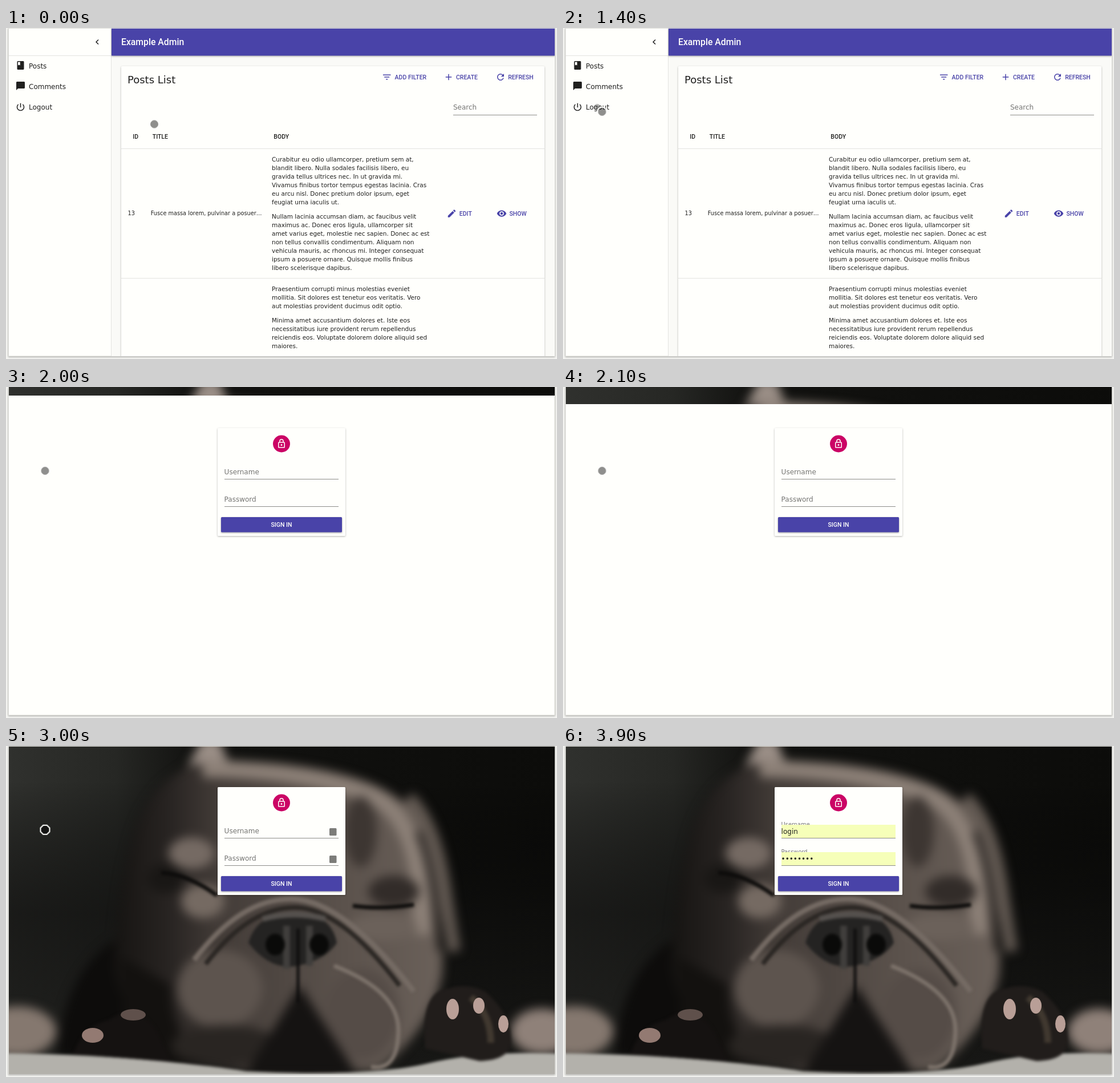
An HTML page that plays this animation: 966 px wide and 580 px high, repeating every 4000 ms.

```html
<!DOCTYPE html>
<html lang="en">
<head>
<meta charset="utf-8">
<title>Admin sign out</title>
<style>
  html, body { margin: 0; width: 100%; height: 100%; overflow: hidden; background: #f4f4f1; }
  svg { display: block; }
  text { font: 12px "DejaVu Sans", sans-serif; fill: #20201f; white-space: pre; }
  .body { font-size: 10.5px; }
  .cell { font-size: 9.75px; }
  .heading { font-size: 18px; }
  .caps { font: 500 10.5px Roboto, sans-serif; }
  .bar { font: 500 15.75px Roboto, sans-serif; }
  .hint { fill: #757573; }
  .small { font-size: 9.84px; }
  .dark { fill: #20201f; }
  .accent { fill: #4943a8; }
  .light { fill: #fffffc; }
  .paper { fill: #fffffc; filter: drop-shadow(0 1px 1.5px rgba(0,0,0,.3)); }
  .raised { filter: drop-shadow(0 1.5px 1.5px rgba(0,0,0,.35)); }
  .rule { stroke: #e3e3e0; }
  .field { stroke: #8d8d8a; }
</style>
</head>
<body>
<svg id="stage" width="966" height="580" viewBox="0 0 966 580">
  <defs>
    <clipPath id="window"><rect x="5" y="1" width="957" height="574"/></clipPath>
    <clipPath id="loaded"><rect id="loadedBox" x="5" y="1" width="957" height="574"/></clipPath>
    <linearGradient id="wall">
      <stop offset="0" stop-color="#30312e"/><stop offset=".2" stop-color="#262724"/>
      <stop offset=".34" stop-color="#121210"/><stop offset="1" stop-color="#0c0c0a"/>
    </linearGradient>
    <linearGradient id="shade" x2="0" y2="1">
      <stop offset="0" stop-color="#000" stop-opacity="0"/><stop offset=".45" stop-color="#0e0e0d" stop-opacity=".65"/>
      <stop offset="1" stop-color="#1c1c1a" stop-opacity=".7"/>
    </linearGradient>
    <linearGradient id="fur">
      <stop offset="0" stop-color="#161412"/><stop offset=".17" stop-color="#282422"/>
      <stop offset=".32" stop-color="#433c38"/><stop offset=".7" stop-color="#5b524c"/>
      <stop offset="1" stop-color="#6b615a"/>
    </linearGradient>
    <filter id="soft" x="-30%" y="-30%" width="160%" height="160%" color-interpolation-filters="sRGB"><feGaussianBlur stdDeviation="9"/></filter>
    <filter id="crisp" x="-30%" y="-30%" width="160%" height="160%" color-interpolation-filters="sRGB"><feGaussianBlur stdDeviation="2.5"/></filter>
  </defs>

  <rect width="966" height="580" fill="#f4f4f1"/>
  <rect class="raised" x="4.5" y=".5" width="957.5" height="574.5" fill="#fffffc" stroke="#deded9"/>

  <g id="list" clip-path="url(#window)">
    <rect x="185" y="1" width="777" height="574" fill="#fafaf7"/>
    <path class="rule" d="M184.5 1V575M5 48.5H184" fill="none"/>
    <rect class="accent raised" x="185" y="1" width="777" height="47.5"/>
    <rect class="paper" x="202" y="67" width="742" height="540" rx="1.5"/>
    <path class="rule" d="M202 211.5H944M202 438.5H944"/>
    <path class="field" d="M784 152.5H931"/>
    <circle id="press" cx="60" cy="139" r="6" fill="#b7b7b5"/>
  </g>

  <g id="photo" clip-path="url(#loaded)">
    <rect width="966" height="580" fill="url(#wall)"/>
    <rect y="60" width="966" height="520" fill="url(#shade)"/>
    <g filter="url(#soft)">
      <ellipse cx="20" cy="500" rx="68" ry="44" fill="#85786f"/>
      <ellipse cx="940" cy="500" rx="55" ry="40" fill="#8f8179"/>
      <path d="M90 545Q100 400 190 340L300 560Z" fill="#0d0c0b"/>
      <path d="M318 36L344 -12H374L392 35Z" fill="#9a8e86"/>
      <path d="M330 32Q250 65 222 160T190 390Q210 500 300 555L440 570L650 570Q745 500 765 400Q770 250 740 150Q700 70 560 42Q440 20 330 32Z" fill="url(#fur)"/>
      <path d="M345 40Q520 40 640 85Q735 130 728 330" fill="none" stroke="#8c8077" stroke-width="30"/>
      <path d="M705 90Q750 130 768 240Q778 310 786 360" fill="none" stroke="#625952" stroke-width="22"/>
      <path d="M722 150Q752 220 762 360" fill="none" stroke="#1d1a18" stroke-width="10"/>
      <ellipse cx="622" cy="150" rx="28" ry="62" fill="#3d3632"/>
      <ellipse cx="325" cy="188" rx="40" ry="28" fill="#756a63"/>
      <ellipse cx="280" cy="232" rx="32" ry="26" fill="#191715"/>
      <ellipse cx="345" cy="272" rx="38" ry="30" fill="#756a62"/>
      <ellipse cx="680" cy="255" rx="45" ry="28" fill="#322c29"/>
      <ellipse cx="660" cy="318" rx="62" ry="24" fill="#6b615a"/>
      <path d="M200 370Q260 400 290 420Q285 500 350 560L210 565Z" fill="#13110f"/>
      <ellipse cx="375" cy="425" rx="75" ry="68" fill="#5d544e"/>
      <ellipse cx="385" cy="525" rx="95" ry="36" fill="#292522"/>
      <ellipse cx="625" cy="470" rx="65" ry="80" fill="#554c47"/>
      <path d="M515 420L615 575H420Z" fill="#151312"/>
    </g>
    <g filter="url(#crisp)">
      <path d="M330 375Q410 268 500 268T715 430" fill="none" stroke="#756b64" stroke-width="9"/>
      <path d="M350 382Q425 284 505 283T690 420" fill="none" stroke="#2a2623" stroke-width="8"/>
      <path d="M272 222Q320 225 370 262M608 280Q655 287 715 278" fill="none" stroke="#0d0c0b" stroke-width="7"/>
      <path d="M575 385Q690 430 688 500T640 562" fill="none" stroke="#7d736b" stroke-width="7"/>
      <path d="M425 345Q440 292 505 292T580 345Q560 375 512 385T425 345Z" fill="#242322"/>
      <path d="M450 303Q505 288 560 303" fill="none" stroke="#55514e" stroke-width="10"/>
      <path d="M492 315V390M532 315V385" stroke="#403e3c" stroke-width="12"/>
      <ellipse cx="472" cy="348" rx="17" ry="19" fill="#0a0a09"/>
      <ellipse cx="549" cy="348" rx="17" ry="19" fill="#0a0a09"/>
      <path d="M512 320V450" stroke="#0d0c0c" stroke-width="5"/>
      <path d="M-20 538Q150 540 270 552T420 570Q640 580 740 556T990 540V600H-20Z" fill="#b3b1ab"/>
      <path d="M735 530Q725 430 775 425Q810 415 840 430Q885 470 885 510Q890 550 830 552Z" fill="#211d1b"/>
      <path d="M815 440Q850 470 850 520" fill="none" stroke="#40382f" stroke-width="12"/>
      <path d="M118 540Q135 490 180 480Q230 445 265 500L290 553Z" fill="#151211"/>
    </g>
    <g fill="#b99f97">
      <ellipse cx="783" cy="461" rx="11" ry="18"/><ellipse cx="829" cy="455" rx="10" ry="14"/>
      <ellipse cx="872" cy="487" rx="9" ry="15"/>
      <ellipse cx="152" cy="507" rx="19" ry="13" fill="#937a72"/><ellipse cx="223" cy="471" rx="22" ry="10" fill="#5f504b"/>
    </g>
  </g>

  <g id="login">
    <rect class="paper" x="371" y="72" width="224" height="189" rx="1.5"/>
    <circle cx="483" cy="99.5" r="15" fill="#cb0565"/>
    <rect class="accent raised" x="377" y="228" width="212" height="26.5" rx="1.5"/>
    <g id="empty"></g>
    <g id="filled"></g>
    <path class="field" d="M383 161.5H583M383 209.5H583"/>
    <g id="badges" fill="#7c7c79">
      <rect x="567" y="144" width="12.5" height="13" rx="1.5"/>
      <rect x="567" y="192" width="12.5" height="13" rx="1.5"/>
    </g>
  </g>

  <g id="cursor">
    <circle r="7" fill="#000" fill-opacity=".44"/>
    <path d="M-3.3 -8H3.3L8 -3.3V3.3L3.3 8H-3.3L-8 3.3V-3.3Z" fill="none" stroke="#fffffc" stroke-width="2"/>
  </g>
</svg>

<script>
const DURATION = 4000, TICKS = 40;
const $ = id => document.getElementById(id);

function add(parent, tag, attrs, content = '') {
  const el = document.createElementNS('http://www.w3.org/2000/svg', tag);
  for (const key in attrs) el.setAttribute(key, attrs[key]);
  el.textContent = content;
  $(parent).append(el);
  return el;
}
const label = (parent, x, y, content, cls = '') => add(parent, 'text', { x, y, class: cls }, content);
const icon = (parent, x, y, d, cls = 'dark') =>
  add(parent, 'path', { d, class: cls, transform: `translate(${x} ${y}) scale(.75)` });

// List page
label('list', 202, 30, 'Example Admin', 'bar light');
label('list', 40, 71, 'Posts');
label('list', 40, 107, 'Comments');
label('list', 40, 143, 'Logout');
label('list', 213, 96.5, 'Posts List', 'heading');
label('list', 784, 143, 'Search', 'hint');
label('list', 222.3, 194, 'ID', 'caps');
label('list', 256.8, 194, 'TITLE', 'caps');
label('list', 469.3, 194, 'BODY', 'caps');
label('list', 213.5, 328, '13', 'cell');
label('list', 253.7, 328, 'Fusce massa lorem, pulvinar a posuer…', 'cell');
label('list', 681.6, 90, 'ADD FILTER', 'caps accent');
label('list', 789, 90, 'CREATE', 'caps accent');
label('list', 880.2, 90, 'REFRESH', 'caps accent');
label('list', 794.8, 329, 'EDIT', 'caps accent');
label('list', 882.4, 329, 'SHOW', 'caps accent');

const paragraphs = [
  [234, `Curabitur eu odio ullamcorper, pretium sem at,
blandit libero. Nulla sodales facilisis libero, eu
gravida tellus ultrices nec. In ut gravida mi.
Vivamus finibus tortor tempus egestas lacinia. Cras
eu arcu nisl. Donec pretium dolor ipsum, eget
feugiat urna iaculis ut.`],
  [334, `Nullam lacinia accumsan diam, ac faucibus velit
maximus ac. Donec eros ligula, ullamcorper sit
amet varius eget, molestie nec sapien. Donec ac est
non tellus convallis condimentum. Aliquam non
vehicula mauris, ac rhoncus mi. Integer consequat
ipsum a posuere ornare. Quisque mollis finibus
libero scelerisque dapibus.`],
  [461, `Praesentium corrupti minus molestias eveniet
mollitia. Sit dolores est tenetur eos veritatis. Vero
aut molestias provident ducimus odit optio.`],
  [516, `Minima amet accusantium dolores et. Iste eos
necessitatibus iure provident rerum repellendus
reiciendis eos. Voluptate dolorem dolore aliquid sed
maiores.`]
];
for (const [top, copy] of paragraphs)
  copy.split('\n').forEach((line, i) => label('list', 466, top + i * 15, line, 'body'));

icon('list', 151, 15.5, 'M15.41 7.41L14 6l-6 6 6 6 1.41-1.41L10.83 12z');
icon('list', 16.5, 56.5, 'M18 2H6c-1.1 0-2 .9-2 2v16c0 1.1.9 2 2 2h12c1.1 0 2-.9 2-2V4c0-1.1-.9-2-2-2zM6 4h5v8l-2.5-1.5L6 12V4z');
icon('list', 16.5, 92.5, 'M20 2H4c-1.1 0-2 .9-2 2v18l4-4h14c1.1 0 2-.9 2-2V4c0-1.1-.9-2-2-2z');
icon('list', 16.5, 129.5, 'M13 3h-2v10h2V3zm4.83 2.17l-1.42 1.42C17.99 7.86 19 9.81 19 12c0 3.87-3.13 7-7 7s-7-3.13-7-7c0-2.19 1.01-4.14 2.58-5.42L6.17 5.17C4.23 6.82 3 9.26 3 12c0 4.97 4.03 9 9 9s9-4.03 9-9c0-2.74-1.23-5.18-3.17-6.83z');
icon('list', 658.7, 77, 'M10 18h4v-2h-4v2zM3 6v2h18V6H3zm3 7h12v-2H6v2z', 'accent');
icon('list', 767, 77, 'M19 13h-6v6h-2v-6H5v-2h6V5h2v6h6v2z', 'accent');
icon('list', 858, 77, 'M17.65 6.35A8 8 0 1 0 19.73 14h-2.08A6 6 0 1 1 16.22 7.78L13 11h7V4z', 'accent');
icon('list', 772.5, 316, 'M3 17.25V21h3.75L17.81 9.94l-3.75-3.75zM20.71 7.04a1 1 0 0 0 0-1.41l-2.34-2.34a1 1 0 0 0-1.41 0l-1.83 1.83 3.75 3.75z', 'accent');
icon('list', 860, 316, 'M12 4.5C7 4.5 2.73 7.61 1 12c1.73 4.39 6 7.5 11 7.5s9.27-3.11 11-7.5c-1.73-4.39-6-7.5-11-7.5zM12 17a5 5 0 1 1 0-10a5 5 0 0 1 0 10zM12 9a3 3 0 1 0 0 6a3 3 0 0 0 0-6z', 'accent');

// Login page
icon('login', 474, 90.2, 'M18 8h-1V6A5 5 0 0 0 7 6v2H6a2 2 0 0 0-2 2v10a2 2 0 0 0 2 2h12a2 2 0 0 0 2-2V10a2 2 0 0 0-2-2zM9 6a3 3 0 0 1 6 0v2H9zM18 20H6V10h12zM12 17a2 2 0 0 0 0-4a2 2 0 0 0 0 4z', 'light');
label('login', 483, 245, 'SIGN IN', 'caps light').setAttribute('text-anchor', 'middle');
[['Username', 'login', 138], ['Password', '••••••••', 186]].forEach(([name, value, y]) => {
  label('empty', 382.6, y + 15.4, name, 'hint');
  label('filled', 382.6, y + 2.8, name, 'hint small');
  add('filled', 'rect', { x: 383, y, width: 200, height: 24, fill: '#f6ffb9' });
  label('filled', 382.6, y + 16, value);
});

// Steps are [tick, value]; each value holds until the next tick.
function play(id, prop, steps) {
  const frames = steps.map(([tick, value]) => ({ offset: tick / TICKS, [prop]: value, easing: 'step-end' }));
  frames.push({ offset: 1, [prop]: steps.at(-1)[1] });
  $(id).animate(frames, { duration: DURATION, iterations: Infinity });
}
const show = (id, from, to) => play(id, 'opacity', [
  ...(from ? [[0, 0]] : []), [from, 1], ...(to < TICKS ? [[to, 0]] : [])
]);

const at = (x, y) => `translate(${x}px, ${y}px)`;
const glide = (tick, count, [x0, y0], [x1, y1]) => Array.from({ length: count }, (_, i) => {
  const p = (i + 1) / count, e = p * p * (3 - 2 * p);
  return [tick + i, at(x0 + (x1 - x0) * e, y0 + (y1 - y0) * e)];
});

const rest = [260, 168.5], logout = [68.5, 146.8], field = [450, 150];
play('cursor', 'transform', [[0, at(...rest)], ...glide(4, 6, rest, logout), ...glide(32, 6, logout, field)]);
show('cursor', 0, 38);
show('list', 0, 16);
show('press', 13, 16);
show('login', 16, TICKS);
show('photo', 20, TICKS);
play('loadedBox', 'transform', [[0, 'scaleY(.026)'], [21, 'scaleY(.052)'], [24, 'scaleY(1)']]);
show('badges', 24, 39);
show('empty', 0, 39);
show('filled', 39, TICKS);
</script>
</body>
</html>
```
